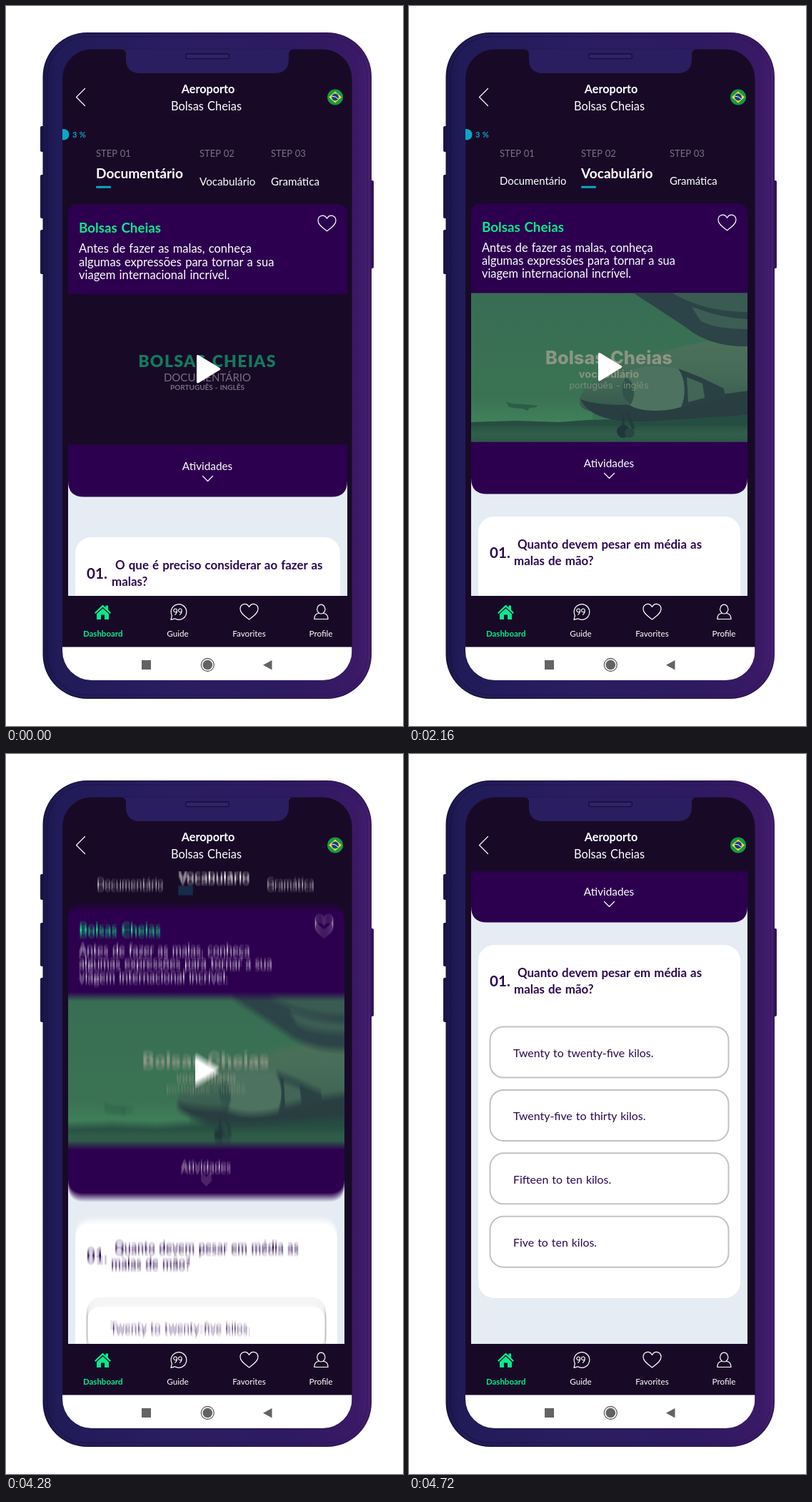
These frames come from a looping animation (556 px wide and 1007 px high, 6000 ms). An HTML page:

```html
<!DOCTYPE html>
<html lang="pt">
<head>
<meta charset="utf-8">
<title>Lesson screen</title>
<style>
html, body { margin: 0; width: 100%; height: 100%; overflow: hidden; background: #fff; }
svg { display: block; }
text { font-family: Lato, "Open Sans", sans-serif; word-spacing: .06em; }
.line { fill: none; stroke: #fff; stroke-width: 1.2; stroke-linecap: round; stroke-linejoin: round; }
</style>
</head>
<body>
<svg id="stage" width="556" height="1007" viewBox="0 0 556 1007" xmlns="http://www.w3.org/2000/svg"></svg>
<script>
const DARK = '#180a27', PLUM = '#2d004f', GREEN = '#0ce88a', TEAL = '#0ea6c4', MIST = '#e5ecf3', INK = '#2b0850';
const LOOP = 6000, FRAME = 40, SCROLL = 447;
const LESSON = 'Bolsas Cheias';

const text = (x, y, size, str, { fill = '#fff', weight = 400, anchor = 'start', more = '' } = {}) =>
  `<text x="${x}" y="${y}" font-size="${size}" fill="${fill}" font-weight="${weight}" text-anchor="${anchor}" ${more}>${str}</text>`;
const rect = (x, y, w, h, fill, r = 0, more = '') =>
  `<rect x="${x}" y="${y}" width="${w}" height="${h}" rx="${r}" fill="${fill}" ${more}/>`;
const path = (d, fill, more = '') => `<path d="${d}" fill="${fill}" ${more}/>`;
const line = (d, more = '') => `<path class="line" d="${d}" ${more}/>`;
const circle = (x, y, r, fill, more = '') => `<circle cx="${x}" cy="${y}" r="${r}" fill="${fill}" ${more}/>`;
const heart = (x, y) =>
  line(`M${x} ${y + 10.5}C${x - 5} ${y + 6.5} ${x - 12.5} ${y + 2} ${x - 12.5} ${y - 4}
    C${x - 12.5} ${y - 12} ${x - 3.5} ${y - 13.5} ${x} ${y - 7}
    C${x + 3.5} ${y - 13.5} ${x + 12.5} ${y - 12} ${x + 12.5} ${y - 4}
    C${x + 12.5} ${y + 2} ${x + 5} ${y + 6.5} ${x} ${y + 10.5}Z`);
const play = (x, y) =>
  path(`M${x} ${y + 2}q0 -3 3 -1.6L${x + 32} ${y + 18}q2.6 1.6 0 3.2L${x + 3} ${y + 39}q-3 1.4 -3 -1.6Z`, '#fff');

// Lesson page: tabs, description card, video and first question
function page(p) {
  const { right, top, videoTop, videoEnd, bottom, cardTop } = p;
  const mid = (87 + right) / 2, width = right - 87;
  const tabs = p.tabs.map((x, i) => {
    const active = i === p.active;
    return text(x, 211, 13, `STEP 0${i + 1}`, { fill: '#7a7284' }) +
      text(x, active ? 241 : p.tabLine, active ? 19.1 : p.tabSize, ['Documentário', 'Vocabulário', 'Gramática'][i],
        { weight: active ? 700 : 400 }) +
      (active ? rect(x, 251.7, 21, 3, TEAL, 1.2) : '');
  }).join('');
  const intro = ['Antes de fazer as malas, conheça', 'algumas expressões para tornar a sua', 'viagem internacional incrível.']
    .map((str, i) => text(102, p.introLine + i * p.leading, p.introSize, str)).join('');
  return circle(80.7, 179.7, 7.8, TEAL) + text(93, 184, 11, '3 %', { fill: TEAL, weight: 700 }) + tabs +
    rect(87, 600, width, 800, MIST) +
    path(`M87 ${top + 16}q0 -16 16 -16H${right - 16}q16 0 16 16V${bottom - 22}q0 22 -22 22H109q-22 0 -22 -22Z`, PLUM) +
    text(102, p.titleLine, 18.8, LESSON, { fill: GREEN, weight: 700 }) +
    heart(right - 28.5, top + 27.3) + intro +
    `<svg x="87" y="${videoTop}" width="${width}" height="${videoEnd - videoTop}" viewBox="87 ${videoTop} ${width} ${videoEnd - videoTop}">${p.video}</svg>` +
    play(mid - 15.5, p.playTop) +
    text(mid - .5, bottom - 37.5, 15.3, 'Atividades', { anchor: 'middle' }) +
    line(`M${mid - 7} ${bottom - 29}l7 7l7 -7`) +
    rect(97, cardTop, right - 107, 494, '#fff', 22) +
    text(113, cardTop + 57.5, 20.6, '01.', { fill: INK, weight: 700 }) +
    text(p.askX, cardTop + 45, 16.9, p.ask[0], { fill: INK, weight: 700 }) +
    text(p.askX - 5, cardTop + 67.5, 16.9, p.ask[1], { fill: INK, weight: 700 });
}

const titleVideo = rect(87, 403, 391, 211, DARK) +
  text(282, 505, 23, LESSON.toUpperCase(), { fill: '#147a5c', weight: 900, anchor: 'middle', more: 'letter-spacing="1.3"' }) +
  text(282, 525, 15, 'DOCUMENTÁRIO', { fill: '#77707f', anchor: 'middle' }) +
  text(282, 537, 10, 'PORTUGUÊS - INGLÊS', { fill: '#77707f', weight: 700, anchor: 'middle' });

const INTER = 'style="font-family:Inter,sans-serif"';
const planeVideo = rect(87, 401, 388, 209, 'url(#sky)') +
  rect(87, 545, 170, 38, 'url(#glow)') +
  path('M87 582L150 580L210 582L250 579L475 572V592H87Z', '#264d41') +
  rect(87, 587, 388, 23, 'url(#ground)') +
  path('M136 553l4 8q20 4 38 0l3 -2l-20 -2l-18 -1ZM152 560l14 6l3 -4Z', '#2b5e48') +
  // fuselage and its shaded belly
  path('M475 462C430 465 385 474 340 488C300 499 268 512 248 534C236 548 236 559 246 564C275 576 340 570 400 562L475 550Z', 'url(#hull)') +
  path('M240 550C270 561 310 558 345 556L475 538V572L350 580C300 584 254 580 240 550Z', '#293e41') +
  // wing with its flaps
  path('M314 401H475V476C445 477 418 470 398 457C374 439 345 422 314 401Z', '#2c4347') +
  path('M368 401H475V428C435 428 400 420 368 401Z', '#395b51') +
  path('M396 421C414 426 434 436 475 438V452C446 452 420 448 408 440Z', '#3c5d53') +
  // engine and exhaust
  path('M302 516C315 501 357 501 385 509L391 557C365 569 323 569 307 557C298 548 297 528 302 516Z', '#4d7360') +
  path('M303 519C295 533 298 550 310 558C318 547 318 525 303 519Z', '#30534a') +
  path('M377 507L408 519L441 535L443 548L407 555L381 561C388 545 388 523 377 507Z', '#2a4144') +
  path('M389 519L411 528L414 548L391 554Z', '#426557') +
  line('M300 573V592M306 570L314 590', 'style="stroke:#243b3d;stroke-width:4"') +
  circle(300, 595, 9, '#20363a') + circle(309, 597, 7, '#294641') +
  text(280, 500.5, 25.4, LESSON, { fill: '#8b9684', weight: 800, anchor: 'middle', more: INTER }) +
  text(280, 520, 14.6, 'vocabulário', { fill: '#89937f', weight: 700, anchor: 'middle', more: INTER }) +
  text(280, 534.5, 12.7, 'português - inglês', { fill: '#7b8d76', anchor: 'middle', more: INTER });

const firstPage = page({
  right: 478, top: 277, videoTop: 403, videoEnd: 613.5, bottom: 686.5, cardTop: 743,
  tabs: [126, 271, 371], active: 0, tabLine: 250.7, tabSize: 15.2,
  titleLine: 316.5, introLine: 345, leading: 18.5, introSize: 16.5, playTop: 488, video: titleVideo,
  askX: 153, ask: ['O que é preciso considerar ao fazer as', 'malas?']
});

const answers = ['Twenty to twenty-five kilos.', 'Twenty-five to thirty kilos.', 'Fifteen to ten kilos.', 'Five to ten kilos.']
  .map((str, i) => {
    const y = 828.5 + i * 88.4;
    return rect(113.5, y, 334, 71, '#fff', 19, 'stroke="#c3c1c7" stroke-width="2"') +
      text(146, y + 42.5, 15.9, str, { fill: INK });
  }).join('');

const secondPage = page({
  right: 474, top: 276, videoTop: 401.5, videoEnd: 609.5, bottom: 682.5, cardTop: 714,
  tabs: [127, 241, 365], active: 1, tabLine: 250, tabSize: 14.9,
  titleLine: 315.5, introLine: 343.5, leading: 18.2, introSize: 16.35, playTop: 485, video: planeVideo,
  askX: 152, ask: ['Quanto devem pesar em média as', 'malas de mão?']
}) + answers;

const gradient = (id, dir, ...stops) => `<linearGradient id="${id}" ${dir}>` +
  stops.map(([at, color, alpha = 1]) => `<stop offset="${at}" stop-color="${color}" stop-opacity="${alpha}"/>`).join('') +
  '</linearGradient>';
const DOWN = 'x1="0" y1="0" x2="0" y2="1"', ACROSS = 'x1="0" y1="0" x2="1" y2="0"';

const defs = `<defs>
  ${gradient('body', ACROSS, [0, '#1a164b'], [.04, '#211b58'], [.4, '#2a1d60'], [.75, '#2d1a60'], [.96, '#3a1966'], [1, '#43206f'])}
  ${gradient('rim', ACROSS, [0, '#15113f'], [.5, '#21174f'], [1, '#32145a'])}
  ${gradient('sky', DOWN, [0, '#386d53'], [.55, '#3a7254'], [1, '#397052'])}
  ${gradient('glow', DOWN, [0, '#468c5f', 0], [1, '#468c5f', .6])}
  ${gradient('ground', DOWN, [0, '#2a5143'], [.5, '#315f4b'], [1, '#2c5646'])}
  ${gradient('hull', DOWN, [0, '#4d7159'], [.55, '#446a57'], [1, '#33564b'])}
  <clipPath id="screen"><rect x="79" y="60.5" width="405.5" height="882.5" rx="41"/></clipPath>
  <clipPath id="view"><rect x="79" y="164" width="405.5" height="661"/></clipPath>
  <filter id="smear" filterUnits="userSpaceOnUse" x="79" y="120" width="406" height="750" color-interpolation-filters="sRGB">
    <feConvolveMatrix id="shutter" order="1 3" kernelMatrix="1 1 1" edgeMode="none"/>
  </filter>
</defs>`;

const phone =
  [[168, 36], [236, 61], [313, 62]].map(([y, h]) => rect(48, y, 8, h, '#1c1546', 2)).join('') +
  rect(508, 244, 7, 123, '#30155a', 2) +
  rect(51.5, 37, 460.5, 932, 'url(#rim)', 62) +
  rect(53, 38.5, 457.5, 929, 'url(#body)', 61) +
  rect(58, 43, 448, 920.5, 'none', 57, 'stroke="url(#rim)" stroke-width="1.4" opacity=".65"');

const notch =
  path('M160 60H404Q396 60.5 396 68V74Q396 94 376 94H188Q168 94 168 74V68Q168 60.5 160 60Z', '#2a1e60') +
  rect(251.5, 67, 61, 6.6, '#2f2468', 3.3, 'stroke="#150d3b" stroke-width="1.3"');

const flag = circle(461, 127.5, 11, '#159a43') +
  path('M461 119.5L470 127.5L461 135.5L452 127.5Z', '#f7d83b') +
  circle(461, 127.5, 4.9, '#173f86') +
  line('M456.8 126.2Q461.5 125.8 464.8 129.6', 'style="stroke-width:1"');

const header = line('M110.5 115.5L98.5 127.5L110.5 139.5') +
  text(283, 122, 16.2, 'Aeroporto', { weight: 700, anchor: 'middle' }) +
  text(280.5, 146, 16.4, LESSON, { anchor: 'middle' }) + flag;

const quote = x => line(`M${x + 2.3} 846.5a2.4 2.4 0 1 1 0.1 -2q.6 4 -2.6 6.8`, 'style="stroke-width:1.1"');
const tabBar = rect(79, 825, 405.5, 71.5, DARK) +
  path('M124 848.5L135.5 837.5L139.5 841.3V838.5H143V844.5L147 848.5L145.5 850L135.5 840.7L125.5 850Z', GREEN) +
  path('M127 850.3L135.5 842.5L144 850.3V858H138V851.5H133V858H127Z', GREEN) +
  line('M231 858.3L232.4 852.5A10.8 10.8 0 1 1 236.5 856.8Z') + quote(237) + quote(243.7) +
  heart(340.5, 847.5) +
  line('M441.3 837.2a5.6 6.4 0 1 1 -.01 0ZM437.5 849.5C433 850 431.8 852.5 431.8 857.5H451C451 852.5 449.6 850 445.2 849.5') +
  [['Dashboard', 135.7], ['Guide', 240.5], ['Favorites', 340.5], ['Profile', 441]].map(([str, x], i) =>
    text(x, 882, i ? 11.7 : 11.5, str, { anchor: 'middle', weight: i ? 400 : 700, fill: i ? '#fff' : GREEN })).join('');

const systemBar = rect(79, 896.5, 405.5, 47, '#fff') +
  rect(190, 915, 13, 13, '#636363') +
  circle(282.3, 921.5, 9, 'none', 'stroke="#636363" stroke-width="1.3"') + circle(282.3, 921.5, 6.8, '#636363') +
  path('M360 921.7L372.5 915V928.4Z', '#636363');

const stage = document.getElementById('stage');
stage.innerHTML = defs + phone + `<g clip-path="url(#screen)">
  ${rect(79, 60, 406, 884, DARK)}
  <g clip-path="url(#view)">
    <g id="first">${firstPage}</g>
    <g id="second">${rect(79, 163, 406, 663, DARK)}<g id="smeared"><g id="scroller">${secondPage}</g></g></g>
  </g>
  ${header}${tabBar}${systemBar}${notch}
</g>`;

const [first, second, smeared, scroller, shutter] =
  ['first', 'second', 'smeared', 'scroller', 'shutter'].map(id => document.getElementById(id));

const progress = (t, from, to) => Math.min(1, Math.max(0, (t - from) / (to - from)));

// Cubic Bézier easing with flat ends, solved by bisection
function ease(x, x1, x2) {
  if (x <= 0 || x >= 1) return x;
  let lo = 0, hi = 1;
  for (let i = 0; i < 24; i++) {
    const s = (lo + hi) / 2, r = 1 - s;
    if (3 * s * r * r * x1 + 3 * s * s * r * x2 + s ** 3 < x) lo = s; else hi = s;
  }
  return lo * lo * (3 - 2 * lo);
}

const scrollAt = t => SCROLL * ease(progress(t, 4000, 4695), .75, .64);

function render(time) {
  const t = Math.floor((time % LOOP) / FRAME) * FRAME;
  const fade = progress(t, 1280, 2160);
  first.setAttribute('display', fade < 1 ? 'inline' : 'none');
  second.setAttribute('display', fade > 0 ? 'inline' : 'none');
  second.setAttribute('opacity', fade);
  scroller.setAttribute('transform', `translate(0 ${-scrollAt(t)})`);
  // Half-frame shutter: an even vertical average over the distance travelled
  const travel = scrollAt(t + FRAME / 4) - scrollAt(t - FRAME / 4);
  const taps = 2 * Math.round(travel / 2) + 1;
  if (taps > 1) {
    shutter.setAttribute('order', `1 ${taps}`);
    shutter.setAttribute('kernelMatrix', Array(taps).fill(1).join(' '));
    smeared.setAttribute('filter', 'url(#smear)');
  } else {
    smeared.removeAttribute('filter');
  }
}

const start = performance.now();
function tick() {
  render(performance.now() - start);
  requestAnimationFrame(tick);
}
tick();
</script>
</body>
</html>
```
